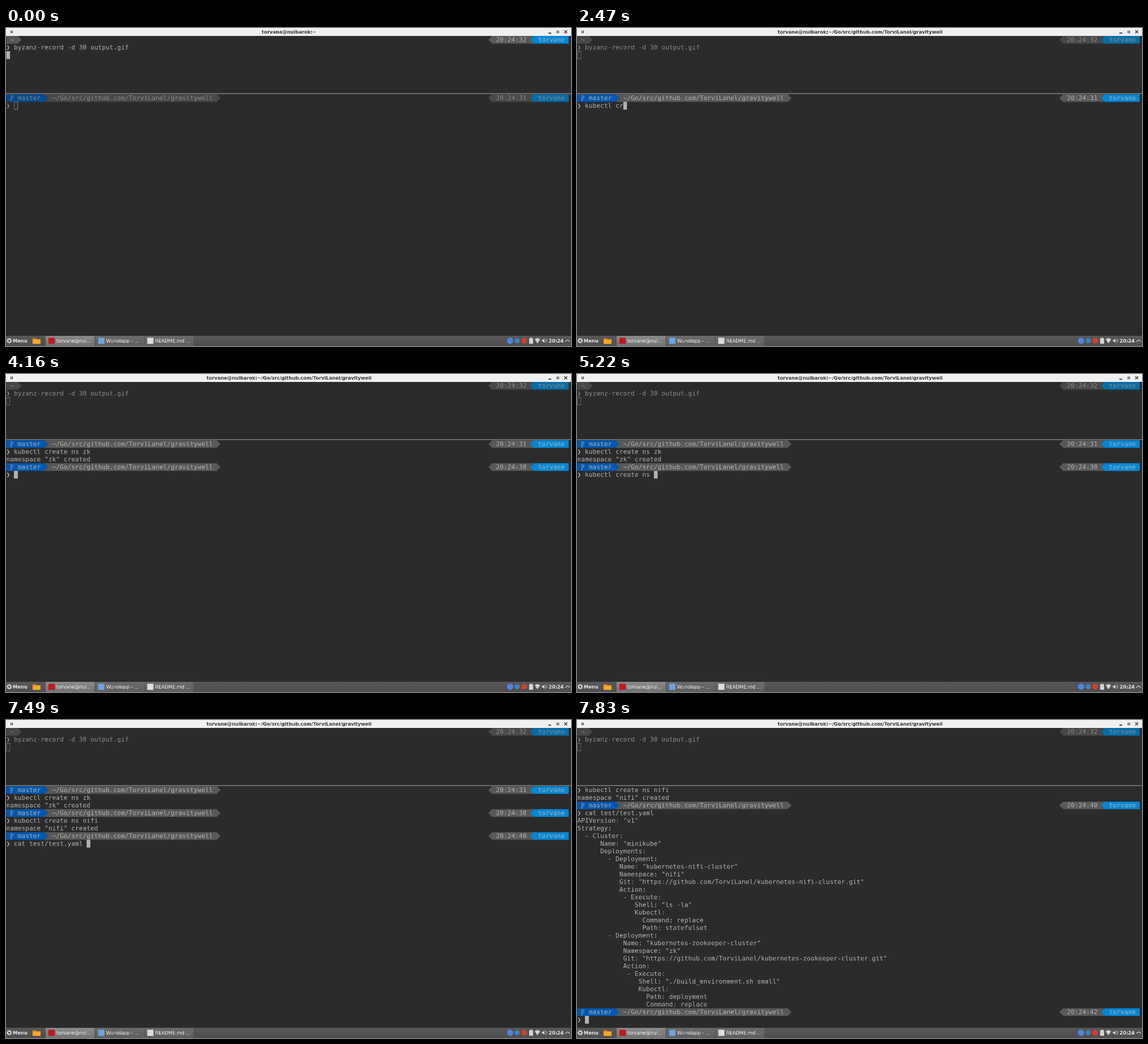
Recreate the animation shown at these times as an HTML page with a canvas. Size 998 px wide and 561 px high, loop 8000 ms.

```html
<!DOCTYPE html>
<html lang="en">
<head>
<meta charset="utf-8">
<title>Terminal session</title>
<style>
  html, body { margin: 0; width: 100%; height: 100%; overflow: hidden; background: #2b2b2b; }
  canvas { display: block; width: 100vw; height: 100vh; }
</style>
</head>
<body>
<canvas id="stage" width="998" height="561"></canvas>
<script>
const LOOP = 8000;
const CELL_W = 13, CELL_H = 26, COLS = 147, ROWS = 31, LEFT = 1;
const MONO = '21.33px "DejaVu Sans Mono", monospace';
const SANS = '16px "DejaVu Sans", sans-serif';
const BOLD = 'bold ' + SANS;
const USER = 'torvane', HOST = USER + '@nulbarok:', OWNER = 'TorviLanel';
const PATH = `~/Go/src/github.com/${OWNER}/gravitywell`;

const LIT = { text: '#b2b2b2', grey: '#585858', blue: '#0087d7', navy: '#0057af', icon: '#7f9cc0' };
const DIM = { text: '#8c8c8c', grey: '#484848', blue: '#066da8', navy: '#044a8c', icon: '#6580a0' };

const YAML = `APIVersion: "v1"
Strategy:
  - Cluster:
      Name: "minikube"
      Deployments:
        - Deployment:
           Name: "kubernetes-nifi-cluster"
           Namespace: "nifi"
           Git: "https://github.com/${OWNER}/kubernetes-nifi-cluster.git"
           Action:
            - Execute:
               Shell: "ls -la"
               Kubectl:
                 Command: replace
                 Path: statefulset
        - Deployment:
            Name: "kubernetes-zookeeper-cluster"
            Namespace: "zk"
            Git: "https://github.com/${OWNER}/kubernetes-zookeeper-cluster.git"
            Action:
             - Execute:
                Shell: "./build_environment.sh small"
                Kubectl:
                  Path: deployment
                  Command: replace`.split('\n');

// ---- timeline: each step changes the state at its time ----
const steps = [];
const at = (time, change) => steps.push({ time, change });
const edit = (time, fn) => at(time, s => s.lines.push(fn(s.lines.pop())));
const type = (text, from, to = from) => [...text].forEach((ch, i) =>
  edit(from + (to - from) * i / Math.max(1, text.length - 1), line => line + ch));
const erase = time => edit(time, line => line.slice(0, -1));
const print = (time, ...lines) => at(time, s => { s.lines.pop(); s.lines.push(...lines, ''); });
const enter = time => at(time, s => s.lines.push(''));
const prompt = (time, clock) => at(time, s => { s.lines.pop(); s.lines.push({ clock }, '❯ '); });
const point = (time, x, y) => at(time, s => { s.pointer = [x, y]; });

point(120, 520, 440);
point(190, 512, 448);
point(260, 504, 456);
at(320, s => { s.focus = 1; });
at(390, s => { s.title = HOST + PATH; });
at(950, s => { s.cursor = false; });
at(1540, s => { s.cursor = true; });
type('k', 1650);
at(1730, s => { s.pointer = null; });
type('ubec', 1800, 2030);
type('tl cr', 2170, 2470);
type('eate ns ', 2670, 3270);
type('zk', 3750, 3830);
enter(3970);
print(4060, 'namespace "zk" created');
prompt(4160, '20:24:38');
edit(4350, line => line + 'kubectl create ns zk');
erase(4600);
erase(4740);
type('b', 4880);
erase(5220);
type('nifi', 5370, 5610);
enter(5720);
print(5830, 'namespace "nifi" created');
prompt(6020, '20:24:40');
type('v', 6240);
erase(6310);
type('cat ', 6370, 6580);
type('te', 6730, 6790);
edit(7300, line => line + 'st/');
edit(7490, line => line + 'test.yaml ');
enter(7710);
print(7830, ...YAML);
prompt(7830, '20:24:42');

function stateAfter(count) {
  const state = {
    focus: 0, cursor: true, pointer: null, title: HOST + '~',
    lines: [{ clock: '20:24:31' }, '❯ ']
  };
  steps.slice(0, count).forEach(step => step.change(state));
  return state;
}

// ---- drawing on a 1920 x 1080 desktop ----
const desktop = document.createElement('canvas');
desktop.width = 1920;
desktop.height = 1080;
const g = desktop.getContext('2d');
const screen = document.getElementById('stage').getContext('2d');
screen.imageSmoothingQuality = 'low';

const colX = col => LEFT + col * CELL_W;

function rect(x, y, w, h, color) {
  g.fillStyle = color;
  g.fillRect(x, y, w, h);
}
function shape(points, color) {
  g.fillStyle = color;
  g.beginPath();
  points.forEach(([x, y]) => g.lineTo(x, y));
  g.fill();
}
function stroke(points, color, width = 2) {
  g.strokeStyle = color;
  g.lineWidth = width;
  g.beginPath();
  points.forEach(([x, y]) => g.lineTo(x, y));
  g.stroke();
}
function disc(x, y, r, color) {
  g.fillStyle = color;
  g.beginPath();
  g.arc(x, y, r, 0, 7);
  g.fill();
}
function arc(x, y, r, a, b, color, width = 2) {
  g.strokeStyle = color;
  g.lineWidth = width;
  g.beginPath();
  g.arc(x, y, r, a, b);
  g.stroke();
}
function label(str, x, y, font, color, align = 'left') {
  g.font = font;
  g.fillStyle = color;
  g.textAlign = align;
  g.fillText(str, x, y);
}
function shade(x, y, w, h, top, bottom) {
  const fill = g.createLinearGradient(0, y, 0, y + h);
  fill.addColorStop(0, top);
  fill.addColorStop(1, bottom);
  rect(x, y, w, h, fill);
}

function cells(str, col, y, color) {
  [...str].forEach((ch, i) => { if (ch !== ' ') label(ch, colX(col + i), y + 20, MONO, color); });
}
function segment(col, count, y, color) {
  rect(colX(col), y, count * CELL_W, CELL_H, color);
}
function arrow(col, y, color, dir) {
  const base = colX(dir > 0 ? col : col + 1);
  shape([[base, y], [base + dir * CELL_W, y + CELL_H / 2], [base, y + CELL_H]], color);
}
function branchIcon(x, y, color) {
  stroke([[x + 3, y + 5], [x + 3, y + 22]], color);
  stroke([[x + 3, y + 17], [x + 9, y + 12], [x + 9, y + 7]], color);
  disc(x + 3, y + 5, 2, color);
  disc(x + 3, y + 22, 2, color);
  disc(x + 9, y + 7, 2, color);
}
function rightPrompt(clock, y, c) {
  arrow(126, y, c.grey, -1);
  segment(127, 11, y, c.grey);
  arrow(137, y, c.blue, -1);
  segment(138, COLS - 138, y, c.blue);
  cells(clock, 128, y, c.text);
  cells(USER, 139, y, c.text);
}
function repoPrompt(clock, y, c) {
  segment(0, 10, y, c.navy);
  segment(10, 45, y, c.grey);
  arrow(10, y, c.navy, 1);
  arrow(55, y, c.grey, 1);
  branchIcon(colX(1), y, c.icon);
  cells('master', 3, y, c.text);
  cells(PATH, 12, y, c.text);
  rightPrompt(clock, y, c);
}
function cursor(col, y, focused, visible, c) {
  if (!focused) {
    g.strokeStyle = c.text;
    g.lineWidth = 1.4;
    g.strokeRect(colX(col) + .7, y + .7, CELL_W - 1.4, CELL_H - 1.4);
  } else if (visible) {
    segment(col, 1, y, c.text);
  }
}

function upperPane(s) {
  const focused = s.focus === 0, c = focused ? LIT : DIM, y = 27;
  segment(0, 3, y, c.grey);
  arrow(3, y, c.grey, 1);
  cells('~', 1, y, c.text);
  rightPrompt('20:24:32', y, c);
  cells('❯ byzanz-record -d 30 output.gif', 0, y + CELL_H, c.text);
  cursor(0, y + 2 * CELL_H, focused, true, c);
}
function lowerPane(s) {
  const focused = s.focus === 1, c = focused ? LIT : DIM;
  const rows = s.lines.slice(-ROWS);
  const rowY = row => 225 + row * CELL_H;
  rows.forEach((line, row) => {
    if (line.clock) repoPrompt(line.clock, rowY(row), c);
    else cells(line, 0, rowY(row), c.text);
  });
  cursor(rows[rows.length - 1].length, rowY(rows.length - 1), focused, s.cursor, c);
}

function titleBar(title) {
  const ink = '#3a3a3a';
  rect(0, 0, 1920, 27, '#f0f0f0');
  label(title, 962, 18.5, BOLD, ink, 'center');
  g.strokeStyle = ink;
  g.lineWidth = 2;
  g.strokeRect(16, 10, 6, 6);
  g.strokeRect(1872, 10, 6, 6);
  rect(1843, 16, 10, 3, ink);
  stroke([[1897, 8], [1907, 18]], ink, 2.5);
  stroke([[1907, 8], [1897, 18]], ink, 2.5);
}

function gear(x, y, color) {
  arc(x, y, 5, 0, 7, color, 2.5);
  for (let i = 0; i < 8; i++) {
    const a = i * Math.PI / 4, cos = Math.cos(a), sin = Math.sin(a);
    stroke([[x + 5 * cos, y + 5 * sin], [x + 9 * cos, y + 9 * sin]], color, 3);
  }
}
function task(x, width, name, icon, active) {
  shade(x, 1046, width, 34, active ? '#8b8b8b' : '#6c6c6c', active ? '#727272' : '#5e5e5e');
  rect(x + 9, 1052, 21, 21, icon);
  label(name, x + 36, 1068, SANS, '#f2f2f2');
}
function taskBar() {
  const ink = '#ececec', pale = '#d2d2d2';
  shade(0, 1045, 1920, 35, '#595959', '#4e4e4e');
  gear(11, 1062, ink);
  label('Menu', 23, 1068, BOLD, ink);
  shape([[90, 1054], [101, 1054], [104, 1057], [117, 1057], [117, 1073], [90, 1073]], '#e88b12');
  rect(90, 1059, 27, 14, '#ffa726');
  task(135, 166, USER + '@nul...', '#c4161c', true);
  task(304, 165, 'Wunolapp - ...', '#6fa3e0');
  task(471, 166, 'README.md ...', '#e2dada');

  disc(1713, 1062, 10.5, '#4f86dc');
  disc(1737, 1062, 8.5, '#3f83c4');
  disc(1761, 1062, 9.5, '#d83c36');
  rect(1781, 1052, 7, 3, pale);
  rect(1778, 1054, 13, 18, pale);
  shape([[1797, 1057], [1801, 1054.5], [1806, 1053.5], [1811, 1054.5], [1815, 1057], [1806, 1071]], pale);
  shape([[1821, 1059], [1825, 1059], [1830, 1054], [1830, 1070], [1825, 1065], [1821, 1065]], pale);
  arc(1829, 1062, 5, -.9, .9, pale, 1.5);
  arc(1829, 1062, 9, -.9, .9, pale, 1.5);
  label('20:24', 1844, 1068, BOLD, ink);
  stroke([[1901, 1065], [1908.5, 1059], [1916, 1065]], ink);
}

function beam(x, y) {
  [['#1c1c1c', 5], ['#c8c8c8', 2.4]].forEach(([color, width]) => {
    stroke([[x, y - 8], [x, y + 8]], color, width);
    stroke([[x - 4, y - 8], [x + 4, y - 8]], color, width);
    stroke([[x - 4, y + 8], [x + 4, y + 8]], color, width);
  });
}

function draw(s) {
  rect(0, 0, 1920, 1080, '#2b2b2b');
  upperPane(s);
  rect(0, 222, 1920, 2, '#a4a4a4');
  lowerPane(s);
  titleBar(s.title);
  taskBar();
  if (s.pointer) beam(...s.pointer);
  screen.drawImage(desktop, 0, 0, 998, 561);
}

let shown = -1;
function tick() {
  const time = performance.now() % LOOP;
  const count = steps.filter(step => step.time <= time).length;
  if (count !== shown) draw(stateAfter(shown = count));
  requestAnimationFrame(tick);
}
tick();
</script>
</body>
</html>
```
